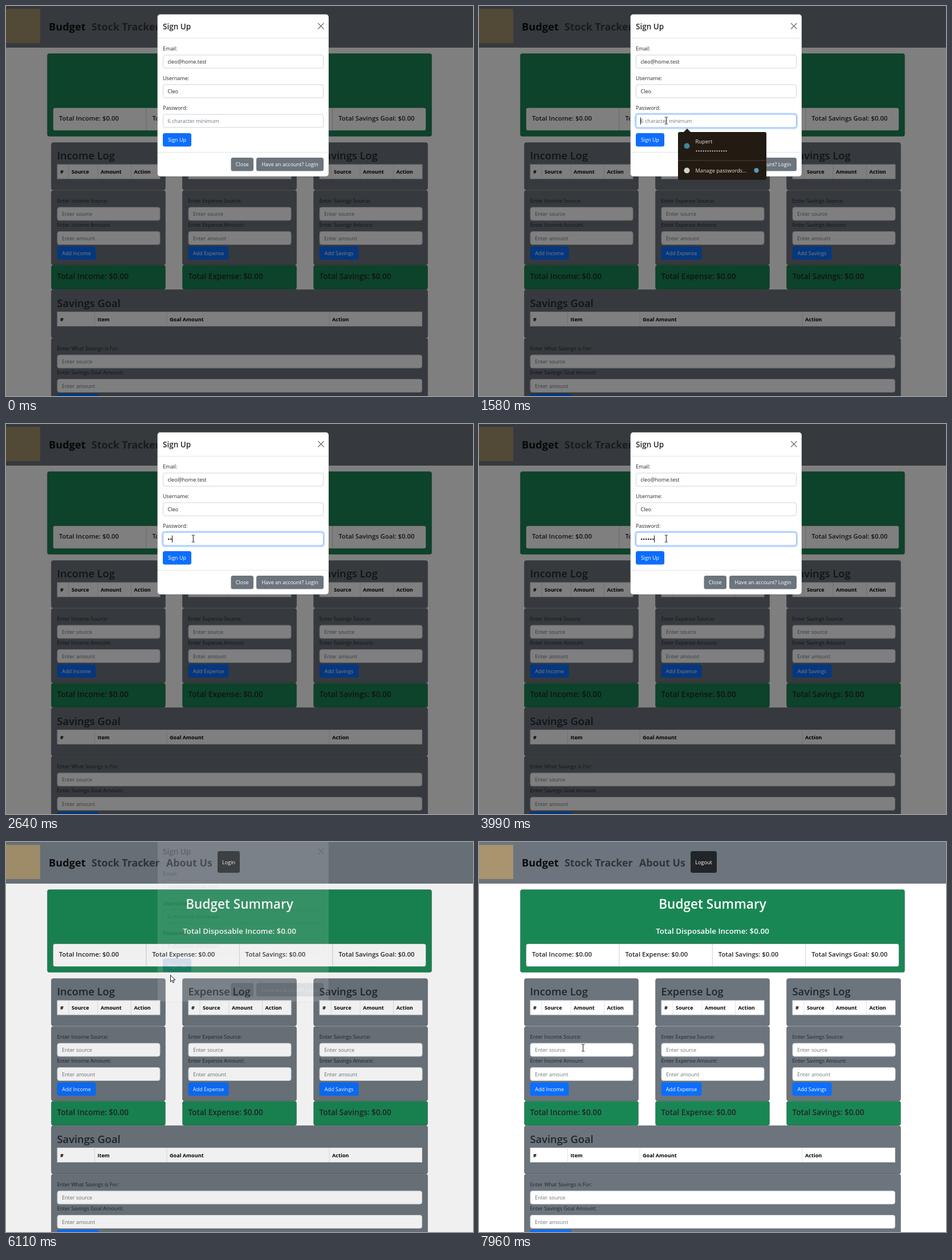
These frames come from a looping animation (819x684 px, 8 s). An HTML page:

```html
<!DOCTYPE html>
<html lang="en">
<head>
<meta charset="utf-8">
<title>Budget sign up</title>
<style>
  html, body { margin: 0; width: 100%; height: 100%; overflow: hidden; background: #fff; }
  svg { display: block; width: 100%; height: 100%; }
  text { font-family: "Open Sans", "Noto Sans", sans-serif; white-space: pre; }
</style>
</head>
<body>
<svg id="stage" viewBox="0 0 819 684"></svg>
<script>
const LOOP = 8000;
const INK = '#212529', GRAY = '#6c757d', GREEN = '#198754', BLUE = '#0d6efd', BLUE_HOVER = '#0b5ed7';
const EDGE = 'rgba(0,0,0,.25)', FIELD_EDGE = '#ced4da', LINE = '#dee2e6';
const stage = document.getElementById('stage');

function add(parent, tag, attrs, content) {
  const node = document.createElementNS('http://www.w3.org/2000/svg', tag);
  for (const key in attrs) node.setAttribute(key, attrs[key]);
  if (content) node.textContent = content;
  return parent.appendChild(node);
}
const group = (parent = stage) => add(parent, 'g', {});
const show = (node, on) => node.setAttribute('display', on ? 'inline' : 'none');

function box(parent, x, y, w, h, fill, stroke = 'none', rx = 0) {
  return add(parent, 'rect', { x, y, width: w, height: h, fill, stroke, rx });
}
function line(parent, x1, y1, x2, y2, stroke = LINE) {
  return add(parent, 'line', { x1, y1, x2, y2, stroke });
}
function label(parent, x, y, content, size = 9.05, fill = INK, weight = 400, anchor = 'start') {
  return add(parent, 'text', { x, y, fill, 'font-size': size, 'font-weight': weight, 'text-anchor': anchor }, content);
}
function disc(parent, cx, cy, r, fill) {
  return add(parent, 'circle', { cx, cy, r, fill });
}
function field(parent, x, y, w, hint) {
  const frame = box(parent, x, y, w, 23, '#fff', FIELD_EDGE, 3.5);
  const text = label(parent, x + 8, y + 15.2, hint, 9.05, GRAY);
  return { frame, text };
}
function button(parent, x, y, w, content, fill = BLUE) {
  const face = box(parent, x, y, w, 23.5, fill, 'none', 3.5);
  label(parent, x + w / 2, y + 15.4, content, 9.05, '#fff', 400, 'middle');
  return face;
}
function table(parent, y, x, w, columns) {
  box(parent, x, y, w, 25, '#fff', LINE);
  columns.forEach(([dx, name], i) => {
    if (i) line(parent, x + dx - 5, y, x + dx - 5, y + 25);
    label(parent, x + dx, y + 16.2, name, 9.1, '#000', 700);
  });
}

// Page
const page = group();
box(page, 0, 0, 819, 73, GRAY);
box(page, 0, 5, 60, 60, '#a8946f');
label(page, 75, 43, 'Budget', 18.2, '#0b0c0d', 700);
label(page, 150, 43, 'Stock Tracker', 17.8, '#313538', 700);
label(page, 281, 43, 'About Us', 17.8, '#313538', 700);

function navButton(w, content) {
  const g = group(page);
  box(g, 371, 16, w, 38, INK, 'none', 3.5);
  label(g, 371 + w / 2, 39, content, 9.05, '#fff', 400, 'middle');
  return g;
}
const login = navButton(39, 'Login');
const logout = navButton(46, 'Logout');

box(page, 72.5, 83.5, 674, 145, GREEN, EDGE, 3.5);
label(page, 409.5, 117, 'Budget Summary', 22.6, '#fff', 600, 'middle');
label(page, 409.5, 161, 'Total Disposable Income: $0.00', 13.4, '#fff', 600, 'middle');
box(page, 82.5, 178.5, 654, 40, '#fff', EDGE, 3.5);
['Income', 'Expense', 'Savings', 'Savings Goal'].forEach((name, i) => {
  const x = 82.5 + i * 163.4;
  if (i) line(page, x, 179, x, 218, '#d0d0d0');
  label(page, x + 10.5, 201, `Total ${name}: $0.00`, 11.3, INK, 600);
});

['Income', 'Expense', 'Savings'].forEach((name, i) => {
  const x = 79.5 + i * 230, inner = x + 10;
  box(page, x, 239.5, 200, 83, GRAY, EDGE, 3.5);
  label(page, inner, 269, `${name} Log`, 18.3, INK, 600);
  table(page, 278, inner + .5, 180, [[5, '#'], [25, 'Source'], [76, 'Amount'], [134.5, 'Action']]);
  box(page, x, 323.5, 200, 130.5, GRAY, EDGE, 3.5);
  label(page, inner, 344.8, `Enter ${name} Source:`);
  field(page, inner + .5, 353, 180, 'Enter source');
  label(page, inner, 387, `Enter ${name} Amount:`);
  field(page, inner + .5, 395.5, 180, 'Enter amount');
  button(page, inner, 421.5, [68, 71, 69][i], `Add ${name}`);
  box(page, x, 454.5, 200, 42.5, GREEN, EDGE, 3.5);
  label(page, inner, 479.3, `Total ${name}: $0.00`, 13.5, INK, 600);
});

box(page, 79.5, 497.5, 660, 84.5, GRAY, EDGE, 3.5);
label(page, 89.5, 527.6, 'Savings Goal', 18.3, INK, 600);
table(page, 536.5, 90, 639.5, [[5, '#'], [70.5, 'Item'], [197, 'Goal Amount'], [482, 'Action']]);
box(page, 79.5, 582.5, 660, 130, GRAY, EDGE, 3.5);
label(page, 89.5, 604, 'Enter What Savings is For:');
field(page, 90, 612, 639.5, 'Enter source');
label(page, 89.5, 646.4, 'Enter Savings Goal Amount:');
field(page, 90, 654.5, 639.5, 'Enter amount');
button(page, 89.5, 680, 73, 'Add Goal');

const backdrop = box(stage, 0, 0, 819, 684, '#000');

// Sign-up dialog
const modal = group();
box(modal, 265.5, 14.5, 300.5, 284.5, '#fff', 'rgba(0,0,0,.2)', 5);
label(modal, 275, 40.7, 'Sign Up', 13.5, INK, 600);
add(modal, 'path', { d: 'M547.5 30.5l9.5 9.5m0-9.5l-9.5 9.5', stroke: '#707070', 'stroke-width': 1.4, 'stroke-linecap': 'round' });
line(modal, 266, 56.5, 566, 56.5);
line(modal, 266, 256.5, 566, 256.5);
const ring = add(modal, 'rect', { x: 274, y: 188.7, width: 284, height: 26, rx: 5, fill: 'none', stroke: '#c2dbfe', 'stroke-width': 2.6 });
const [email, user, pass] = ['Email:', 'Username:', 'Password:'].map((name, i) => {
  label(modal, 275, 77.8 + i * 52, name);
  return field(modal, 275.5, 86 + i * 52, 281, '');
});
const submit = button(modal, 275, 223, 50, 'Sign Up');
button(modal, 394.5, 266, 39.5, 'Close', GRAY);
button(modal, 439, 266, 118, 'Have an account? Login', GRAY);

const dots = Array.from({ length: 9 }, (_, i) => disc(modal, 285.2 + 4 * i, 202, 1.35, INK));
const caret = box(modal, 0, 195.5, 1, 12, '#000');

// Saved-password list
const popup = group();
add(popup, 'path', { d: 'M358.5 221.5l6.5-6.5 6.5 6.5z', fill: '#221b13' });
box(popup, 349, 221, 155, 84, '#221b13', 'none', 3);
line(popup, 349, 271, 504, 271, '#54402c');
disc(popup, 364.5, 245.5, 5, '#3c86a0');
label(popup, 379.5, 241.3, 'Rupert', 9.4, '#e8e4de');
for (let i = 0; i < 14; i++) disc(popup, 381.5 + 4 * i, 254.3, 1.1, '#e8e4de');
disc(popup, 364.5, 288.5, 5, '#d2d2d2');
label(popup, 379.5, 291.8, 'Manage passwords...', 9.2, '#e8e4de');
disc(popup, 486.5, 288.3, 4.2, '#5b97bd');

// Pointers, each with its hot spot at 0,0
const click = disc(stage, 288, 233, 9, 'rgba(228,214,40,.6)');
const pointer = (d, attrs) => add(stage, 'path', { d, ...attrs });
const solid = { fill: '#fff', stroke: '#000', 'stroke-width': .9, 'stroke-linejoin': 'round' };
const pointers = {
  arrow: pointer('M.5 .5V12.2l2.6-2.5 1.8 4.1 1.9-.8-1.8-4h3.7z', solid),
  beam: pointer('M-2.5-6h1.8l.7.6.7-.6h1.8M0-5.4V5.4M-2.5 6h1.8l.7-.6.7.6h1.8', { fill: 'none', stroke: '#111' }),
  hand: pointer('M-1.5 9V1.5a1.5 1.5 0 0 1 3 0V7l3.6 .9a2 2 0 0 1 1.6 2V13l-1.5 4.3h-5.6L-5 11.6c-1-1.8 1-2.8 2-1.4z', solid)
};

// Each step holds until the next and keeps whatever it does not change.
const steps = [];
function at(time, pointerName, x, y, changes = {}) {
  steps.push({ ...steps[steps.length - 1], time, pointerName, x, y, ...changes });
}
at(0, '', 0, 0, { phase: 'open', typed: 0, caret: false, focus: false, list: false, hover: false, click: false });
at(250, 'arrow', 688, 614);
at(510, 'arrow', 520, 430);
at(770, 'arrow', 382, 274);
at(1040, 'beam', 337, 209.5);
at(1310, 'beam', 328.3, 201);
at(1580, 'beam', 328.3, 201, { focus: true, list: true, caret: true });
at(2090, 'beam', 328.3, 201, { caret: false });
at(2370, 'beam', 328.3, 201, { list: false, caret: true, typed: 1 });
at(2640, 'beam', 328.3, 201, { typed: 2 });
at(2900, 'beam', 328.3, 201, { typed: 4 });
at(3190, 'beam', 328.3, 201, { typed: 5 });
at(3720, 'beam', 328.3, 201, { caret: false });
at(3990, 'beam', 328.3, 201, { typed: 6, caret: true });
at(4250, 'beam', 328.3, 201, { typed: 7 });
at(4500, 'beam', 328.3, 201, { typed: 8 });
at(4780, 'beam', 328.3, 201, { typed: 9 });
at(5040, 'beam', 322, 200.5);
at(5310, 'hand', 295, 232, { hover: true, caret: false });
at(5570, 'hand', 289.5, 232);
at(5840, 'hand', 289.5, 232, { click: true });
at(6110, 'arrow', 288, 233, { phase: 'closing', click: false, focus: false, typed: 0 });
at(6370, 'arrow', 430, 170, { phase: 'closed' });
at(6630, 'arrow', 571, 104, { phase: 'member' });
at(6900, 'arrow', 528, 66);
at(7160, 'arrow', 494, 38);
at(7430, 'arrow', 133, 230);
at(7690, 'beam', 257, 409);
at(7960, 'beam', 182.5, 361);

function fill(target, value, hint) {
  target.text.textContent = value || hint;
  target.text.setAttribute('fill', value ? INK : GRAY);
}

function render(s) {
  const open = s.phase === 'open', closing = s.phase === 'closing';
  show(login, s.phase !== 'member');
  show(logout, s.phase === 'member');
  backdrop.setAttribute('opacity', open ? .5 : closing ? .06 : 0);
  show(modal, open || closing);
  modal.setAttribute('opacity', open ? 1 : .13);
  modal.setAttribute('transform', `translate(0 ${open ? 0 : -18.7})`);
  fill(email, open && 'cleo@home.test', 'name@example.com');
  fill(user, open && 'Cleo', '2 character minimum');
  fill(pass, '', s.typed ? '' : '6 character minimum');
  pass.frame.setAttribute('stroke', s.focus ? '#86b7fe' : FIELD_EDGE);
  submit.setAttribute('fill', s.hover ? BLUE_HOVER : BLUE);
  show(ring, s.focus);
  dots.forEach((dot, i) => show(dot, i < s.typed));
  show(caret, s.caret);
  caret.setAttribute('x', 283 + 4 * s.typed);
  show(popup, s.list);
  show(click, s.click);
  for (const name in pointers) show(pointers[name], name === s.pointerName);
  if (s.pointerName) pointers[s.pointerName].setAttribute('transform', `translate(${s.x} ${s.y})`);
}

const start = performance.now();
let current;
function tick() {
  const time = (performance.now() - start) % LOOP;
  const step = steps.filter(s => s.time <= time).pop();
  if (step !== current) render(current = step);
  requestAnimationFrame(tick);
}
tick();
</script>
</body>
</html>
```
